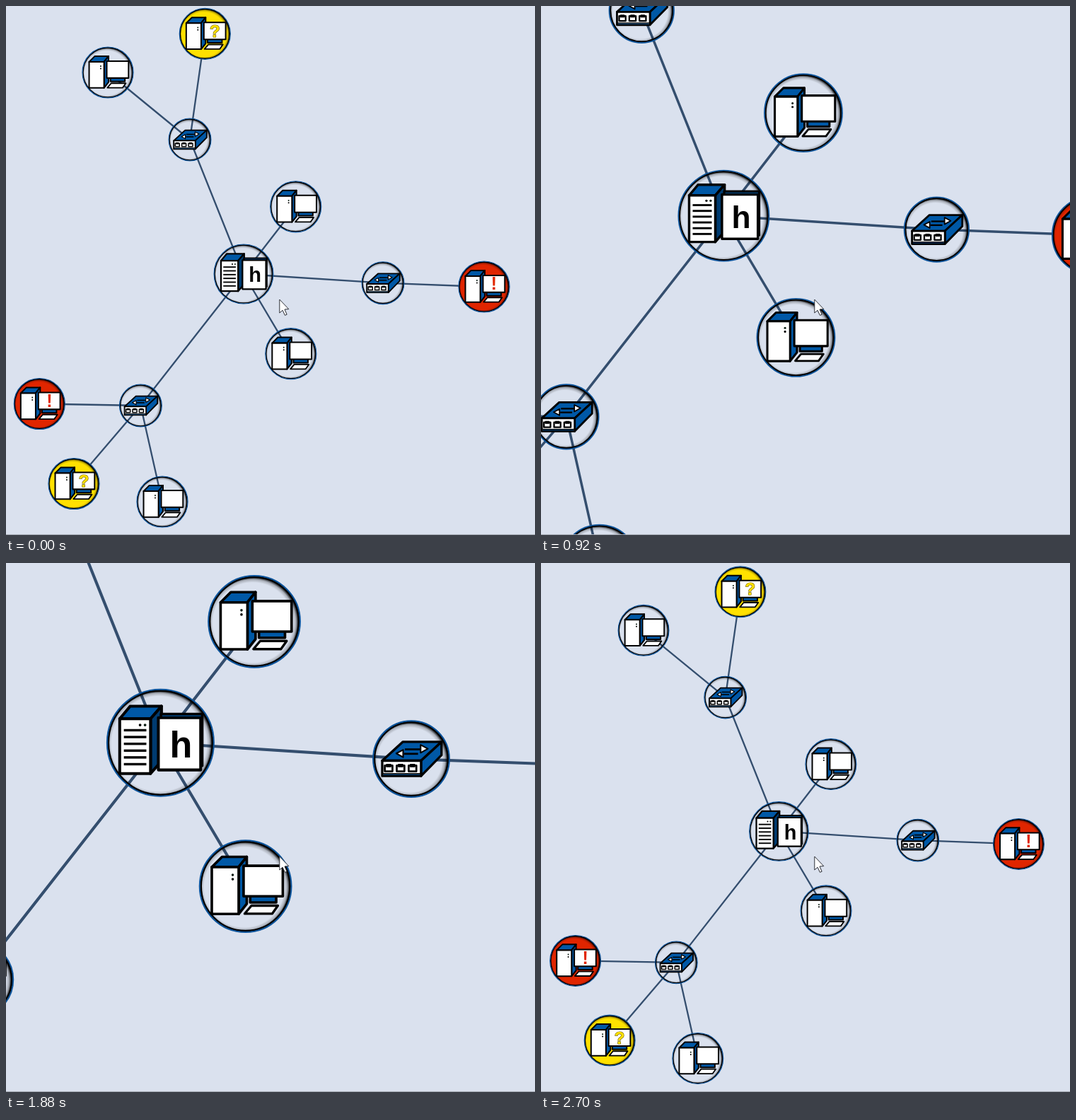
An HTML page with a canvas for the animation above (3.29 s loop, 748 by 748 pixels).

```html
<!DOCTYPE html>
<html lang="en">
<head>
<meta charset="utf-8">
<title>Network map zoom</title>
<style>
  html, body { margin: 0; width: 100%; height: 100%; overflow: hidden; background: #dae1ee; }
  canvas { display: block; width: 748px; height: 748px; }
</style>
</head>
<body>
<canvas id="stage" width="748" height="748"></canvas>
<script>
const ctx = document.getElementById('stage').getContext('2d');
const SIZE = 748, LOOP = 3290;
const PIVOT = { x: 483, y: 535 };
const BG = '#dae1ee', BLUE = '#0058a6', NAVY = '#003b70', INK = '#000';
const RED = '#e02500', YELLOW = '#ffe100', WHITE = '#fff';

// Each wheel turn moves the zoom in hard steps: [time, zoom]
const ZOOM = [
  [0, 1], [30, 1.205], [100, 1.5], [190, 1.728],
  [350, 2.074], [420, 2.575], [520, 2.985],
  [750, 2.49], [850, 1.95], [920, 1.528], [1020, 1.2], [1150, 0.999],
  [1680, 1.175], [1780, 1.46], [1880, 1.8], [2000, 2.15], [2110, 2.4365],
  [2440, 1.97], [2530, 1.5], [2610, 1.17], [2700, 0.997]
];

const node = (kind, x, y, link, alert) => ({ kind, x, y, link, alert });
const nodes = [
  node('server', 336, 379, -1),
  node('hub', 260, 189, 0),
  node('hub', 533, 391.7, 0),
  node('hub', 190.4, 565, 0),
  node('pc', 144, 94, 1),
  node('pc', 281.3, 39.3, 1, '?'),
  node('pc', 409.7, 283.8, 0),
  node('pc', 676, 397, 2, '!'),
  node('pc', 402.8, 491.7, 0),
  node('pc', 47.3, 562.5, 3, '!'),
  node('pc', 96, 675.5, 3, '?'),
  node('pc', 221, 701, 3)
];
const RADIUS = { server: 42.5, hub: 30.5, pc: 36.6 };

function poly(pts, fill, width) {
  ctx.beginPath();
  for (let i = 0; i < pts.length; i += 2) ctx.lineTo(pts[i], pts[i + 1]);
  ctx.closePath();
  ctx.fillStyle = fill;
  ctx.fill();
  ctx.lineWidth = width;
  ctx.strokeStyle = INK;
  ctx.stroke();
}

function box(x1, y1, x2, y2, fill, width) {
  poly([x1, y1, x2, y1, x2, y2, x1, y2], fill, width);
}

function bar(x1, x2, y, width) {
  ctx.fillStyle = INK;
  ctx.fillRect(x1, y - width / 2, x2 - x1, width);
}

function disc(x, y, r, fill) {
  ctx.beginPath();
  ctx.arc(x, y, r, 0, 7);
  ctx.fillStyle = fill;
  ctx.fill();
}

function ring(r, width, color) {
  ctx.beginPath();
  ctx.arc(0, 0, r, 0, 7);
  ctx.lineWidth = width;
  ctx.strokeStyle = color;
  ctx.stroke();
}

function glyph(ch, x, y, size, fill, outline) {
  ctx.font = `bold ${size}px "Liberation Sans", Arial, sans-serif`;
  ctx.textAlign = 'center';
  if (outline) {
    ctx.lineWidth = 1.2;
    ctx.strokeStyle = outline;
    ctx.strokeText(ch, x, y);
  }
  ctx.fillStyle = fill;
  ctx.fillText(ch, x, y);
}

// Draws an icon in its own finer unit
function fine(unit, draw) {
  ctx.save();
  ctx.scale(1 / unit, 1 / unit);
  draw();
  ctx.restore();
}

function badge(r, fill) {
  if (fill) disc(0, 0, r - 1, fill);
  const shade = ctx.createRadialGradient(-1.1, 0.8, r - 5.2, -1.1, 0.8, r);
  shade.addColorStop(0, 'rgba(0,0,0,0)');
  shade.addColorStop(0.45, 'rgba(0,0,0,.22)');
  shade.addColorStop(0.85, 'rgba(0,0,0,.9)');
  shade.addColorStop(1, INK);
  disc(0, 0, r - 1.5, shade);
  ring(r - 1.6, 1.5, INK);
  ring(r - 0.55, 1.1, '#0b539b');
}

const icons = {
  pc(alert) {
    fine(2.985, () => {
      poly([-79, -45, -55, -69, 3, -69, -16, -45], BLUE, 6);
      poly([-16, -45, 3, -69, 3, 41, -16, 65], BLUE, 6);
      box(-79, -45, -16, 65, WHITE, 6);
      disc(-30, -26.5, 3, '#0a1c12');
      disc(-30, -16.5, 3, INK);
      box(11, 22, 72, 38, BLUE, 6);
      box(-4.5, -48, 87.5, 23.5, WHITE, 6);
      poly([14, 45.5, 76, 45.5, 62.5, 64.5, -2, 64.5], WHITE, 5.5);
    });
    if (alert === '!') glyph('!', 14, 4.4, 25, RED);
    if (alert === '?') glyph('?', 14, 4.6, 24, YELLOW, '#6b5b00');
  },

  server() {
    fine(2.4365, () => {
      poly([-78, -46, -58, -70, 2, -70, -19, -46], BLUE, 5.5);
      poly([-19, -46, 2, -70, 2, 35, -19, 59], NAVY, 5.5);
      box(-78, -46, -19, 59, WHITE, 5.5);
      disc(-39, -34, 2.6, INK);
      disc(-29.5, -34, 2.6, '#0a1c12');
      for (let i = 0; i < 6; i++) bar(-70, -27, -24 + i * 13, 4.6);
      box(1, -55, 80, 44, BLUE, 5);
      box(-4, -48, 77, 52, WHITE, 5.5);
    });
    glyph('h', 16.1, 11.3, 29, INK);
  },

  hub() {
    fine(2.985, () => {
      poly([-68, 4, -20, -40, 71, -40, 23, 4], BLUE, 5.5);
      poly([23, 4, 71, -40, 71, -9, 23, 40], BLUE, 5.5);
      box(-68, 4, 23, 40, WHITE, 5.5);
      ctx.fillStyle = NAVY;
      ctx.fillRect(-65, 35, 85, 3);
      bar(-68, 23, 34.5, 2.5);
      for (let i = 0; i < 3; i++) {
        const x = -53 + i * 28;
        box(x - 9, 15.5, x + 9, 29, WHITE, 4.5);
        ctx.fillStyle = INK;
        ctx.fillRect(x - 6, 11.5, 12, 8);
      }
      bar(-17, 16, -12, 4.5);
      bar(-15, 22, -22.5, 4.5);
      poly([-35, -13, -19, -21.5, -19, -4], WHITE, 3.5);
      poly([39, -24, 22, -33, 22, -14.5], WHITE, 3.5);
    });
  }
};

function drawLinks() {
  ctx.lineWidth = 2.3;
  ctx.strokeStyle = '#344e6e';
  ctx.beginPath();
  for (const n of nodes) {
    if (n.link < 0) continue;
    const to = nodes[n.link];
    ctx.moveTo(n.x, n.y);
    ctx.lineTo(to.x, to.y);
  }
  ctx.stroke();
}

function drawNode(n) {
  const fill = n.alert === '!' ? RED : n.alert === '?' ? YELLOW : null;
  ctx.save();
  ctx.translate(n.x, n.y);
  badge(RADIUS[n.kind], fill);
  icons[n.kind](n.alert);
  ctx.restore();
}

function drawPointer() {
  const pts = [0, 0, 0, 19, 4.3, 15.2, 7.6, 22.4, 10.4, 21.2, 7.2, 14, 13, 13.6];
  ctx.save();
  ctx.translate(386.8, 415);
  ctx.beginPath();
  for (let i = 0; i < pts.length; i += 2) ctx.lineTo(pts[i], pts[i + 1]);
  ctx.closePath();
  ctx.fillStyle = WHITE;
  ctx.fill();
  ctx.lineWidth = 1;
  ctx.strokeStyle = '#2b2e36';
  ctx.stroke();
  ctx.restore();
}

function zoomAt(t) {
  let z = 1;
  for (const [at, value] of ZOOM) if (t >= at) z = value;
  return z;
}

function draw(t) {
  const z = zoomAt(t);
  ctx.fillStyle = BG;
  ctx.fillRect(0, 0, SIZE, SIZE);
  ctx.save();
  ctx.lineJoin = 'round';
  ctx.translate(PIVOT.x, PIVOT.y);
  ctx.scale(z, z);
  ctx.translate(-PIVOT.x, -PIVOT.y);
  drawLinks();
  nodes.forEach(drawNode);
  ctx.restore();
  ctx.fillStyle = '#a3a8b2';
  ctx.fillRect(0, SIZE - 1, SIZE, 1);
  drawPointer();
}

const start = performance.now();
function tick() {
  draw((performance.now() - start) % LOOP);
  requestAnimationFrame(tick);
}
tick();
</script>
</body>
</html>
```
